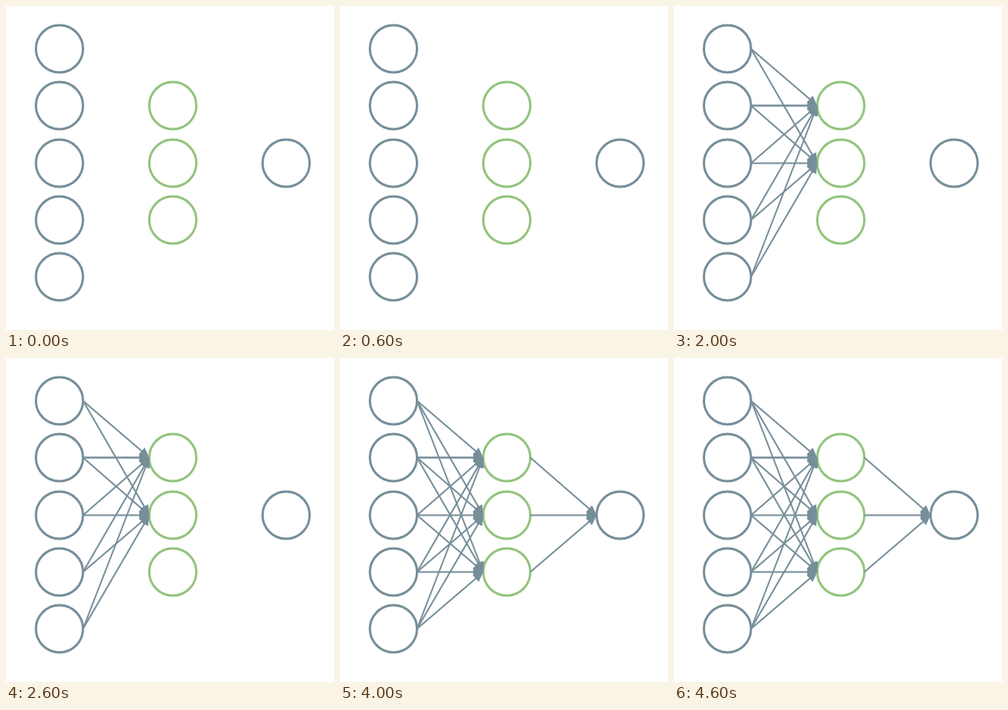
An HTML page with a canvas for the animation above (5 s loop, 411 px wide and 405 px high).

```html
<!DOCTYPE html>
<html>
<head>
<meta charset="utf-8">
<style>
html, body { margin: 0; width: 100%; height: 100%; overflow: hidden; background: #fff; }
canvas { display: block; }
</style>
</head>
<body>
<canvas id="stage" width="411" height="405"></canvas>
<script>
const ctx = document.getElementById('stage').getContext('2d');
const SLATE = '#768e9a', GREEN = '#93c47d', R = 29.5;
const rows = [53.5, 124.5, 196.5, 267.5, 338.5];
const inputs = rows, hidden = rows.slice(1, 4), output = rows[2];
const X = [67, 209, 351];

function node(x, y, color) {
  ctx.strokeStyle = color;
  ctx.lineWidth = 2.9;
  ctx.beginPath();
  ctx.arc(x, y, R, 0, 2 * Math.PI);
  ctx.stroke();
}

// Connects a node to one in the next layer, with a filled head
function arrow(layer, y1, y2, width = 2) {
  const x1 = X[layer] + R, x2 = X[layer + 1] - R;
  const length = Math.hypot(x2 - x1, y2 - y1);
  ctx.save();
  ctx.translate(x1, y1);
  ctx.rotate(Math.atan2(y2 - y1, x2 - x1));
  ctx.strokeStyle = ctx.fillStyle = SLATE;
  ctx.lineWidth = width;
  ctx.beginPath();
  ctx.moveTo(0, 0);
  ctx.lineTo(length - 11, 0);
  ctx.stroke();
  ctx.beginPath();
  ctx.moveTo(length, 0);
  ctx.lineTo(length - 12.5, -5.7);
  ctx.lineTo(length - 12.5, 5.7);
  ctx.fill();
  ctx.restore();
}

function draw(now) {
  const step = Math.floor(now / 1000) % 5;
  ctx.clearRect(0, 0, 411, 405);
  inputs.forEach(y => node(X[0], y, SLATE));
  hidden.forEach(y => node(X[1], y, GREEN));
  node(X[2], output, SLATE);

  hidden.slice(0, step).forEach((to, i) => inputs.forEach(from => {
    const heavy = i === 0 && from === to && step > 1;
    arrow(0, from, to, heavy ? 2.5 : 2);
  }));
  if (step === 4) hidden.forEach(from => arrow(1, from, output));
}

const start = performance.now();
function tick() {
  draw(performance.now() - start);
  requestAnimationFrame(tick);
}
tick();
</script>
</body>
</html>
```
